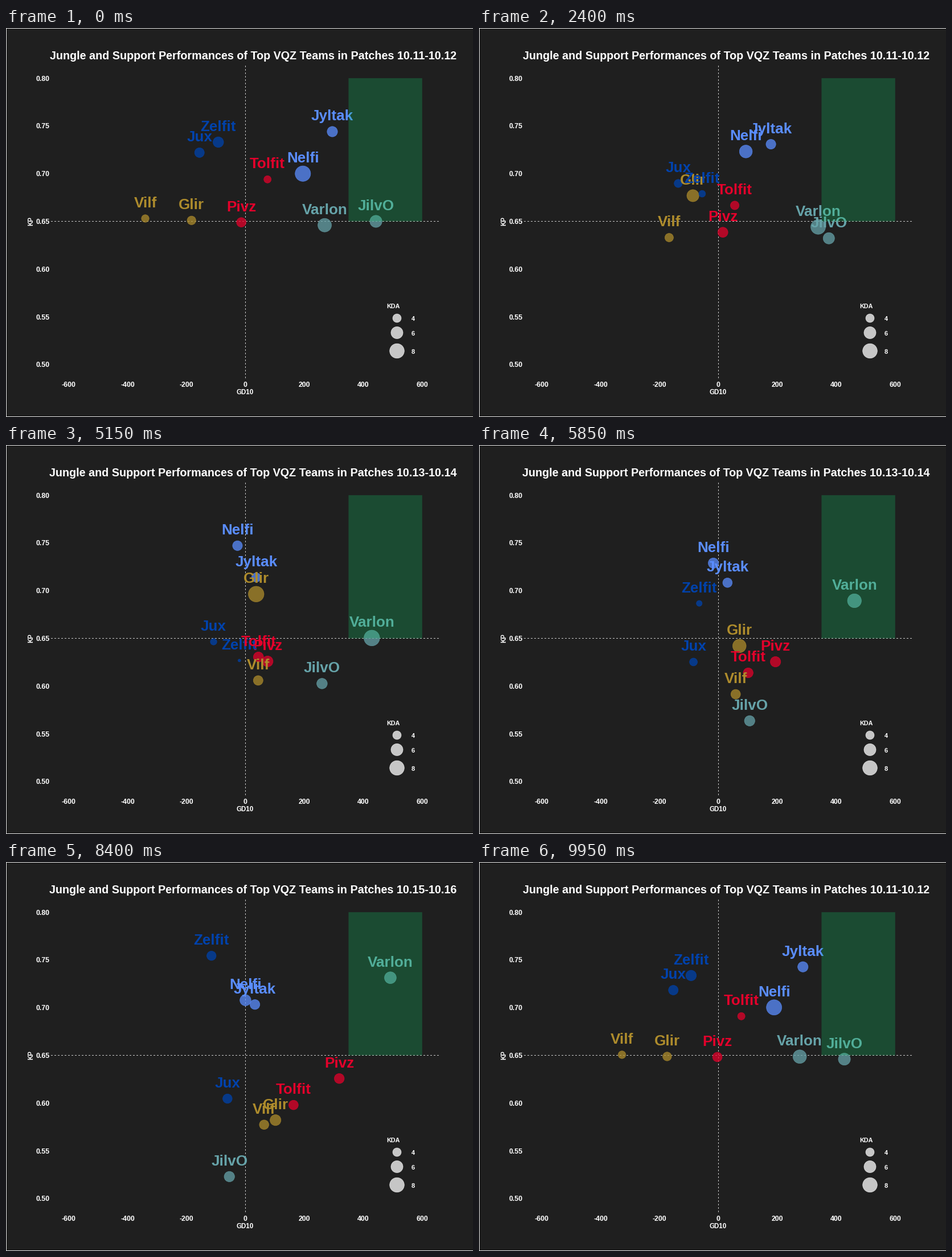
Write a matplotlib script that moves like this. It is 820 px wide and 683 px high and loops after 10000 ms.

```python
import math

import matplotlib.pyplot as plt
from matplotlib.animation import FuncAnimation
from matplotlib.patches import Circle, Rectangle

W, H, DPI = 820, 683, 64
FRAMES, INTERVAL = 200, 50
CYCLE = FRAMES / 3         # one hold plus one transition
MOVE = 33                  # frames per transition
TITLE_LAG = 18             # frames into a transition when the title switches

BACK = "#1f1f1f"
TEAL, GOLD, RED = "#66a3a9", "#ae8c2c", "#e4012b"
SKY, NAVY = "#5a8dff", "#0042ac"

# Name, colour, (GD10, KP) in each patch pair, KDA in the first two
PLAYERS = [
    ("Varlon", TEAL, (269, .646), (422, .642), (499, .734), (7.2, 9.4)),
    ("Glir", GOLD, (-183, .651), (29, .708), (111, .580), (4.1, 9.4)),
    ("Pivz", RED, (-14, .649), (50, .626), (329, .625), (4.5, 5.3)),
    ("Jyltak", SKY, (295, .744), (38, .715), (24, .702), (5.0, 4.3)),
    ("Zelfit", NAVY, (-92, .733), (-11, .614), (-116, .755), (5.1, 2.3)),
    ("JilvO", TEAL, (443, .650), (293, .611), (-70, .519), (6.1, 5.1)),
    ("Jux", NAVY, (-156, .722), (-113, .651), (-58, .601), (4.6, 3.1)),
    ("Tolfit", RED, (75, .694), (32, .634), (166, .595), (3.5, 4.9)),
    ("Nelfi", SKY, (195, .700), (-29, .751), (-6, .708), (8.8, 4.6)),
    ("Vilf", GOLD, (-340, .653), (40, .609), (76, .575), (3.6, 4.6)),
]

plt.rcParams["font.family"] = "Liberation Sans"
plt.rcParams["font.weight"] = "bold"


def px(n):
    """Pixels to points."""
    return n * 72 / DPI


def x_of(gd):
    return 420.4 + 0.5173 * gd


def y_of(kp):
    return 339.5 + 1676 * (0.65 - kp)


def radius(kda):
    return 1 + 4.93 * math.sqrt(kda - 2.27)


def states(points, kdas):
    """Pixel x, y and radius per patch pair; the last KDA settles to the middle."""
    last = 3.2 + 0.16 * sum(kdas)
    return [(x_of(gd), y_of(kp), radius(k))
            for (gd, kp), k in zip(points, (*kdas, last))]


fig = plt.figure(figsize=(W / DPI, H / DPI), dpi=DPI, facecolor=BACK)
ax = fig.add_axes([0, 0, 1, 1])
ax.set_xlim(0, W)
ax.set_ylim(H, 0)
ax.axis("off")


def write(x, y, s, size, color="white", ha="center", va="baseline", **kw):
    return ax.text(x, y, s, fontsize=px(size), color=color, ha=ha, va=va, **kw)


def dot(x, y, r, color):
    return ax.add_patch(Circle((x, y), r, facecolor=color, edgecolor=color,
                               alpha=0.75, linewidth=px(0.7), zorder=2))


def line(xs, ys, width, **kw):
    ax.plot(xs, ys, color="white", lw=px(width), snap=False, zorder=1, **kw)


# Axes, guides and target zone
for i in range(7):
    kp, gd = 0.8 - 0.05 * i, 200 * i - 600
    write(76.5, y_of(kp) + 4.5, f"{kp:.2f}", 12.3, ha="right")
    write(x_of(gd), 629.5, str(gd), 12.3)
write(420, 643, "GD10", 11.5)
write(44.5, 339.5, "KP", 11.5, va="center", rotation=90)

for xs, ys in (((79, 761), (339.5, 339.5)), ((420.5, 420.5), (615, 63))):
    line(xs, ys, 0.75, dashes=(4, 4), dash_capstyle="butt")
line((W, 0.5, 0.5, W), (0.5, 0.5, H - 0.5, H - 0.5), 0.9)

ax.add_patch(Rectangle((x_of(350), y_of(0.8)), x_of(600) - x_of(350),
                       y_of(0.65) - y_of(0.8), facecolor="#13cf6b",
                       alpha=0.25, linewidth=0, snap=False, zorder=4))

# Size legend
write(680, 491.5, "KDA", 10.8)
for kda, y in ((4, 509.5), (6, 535), (8, 567)):
    dot(686.5, y, radius(kda), "white")
    write(714.5, y + 5, str(kda), 11)

title = write(434, 54.8, "", 19.7)
tracks = [states(p[2:5], p[5]) for p in PLAYERS]
dots = [dot(0, 0, 1, p[1]) for p in PLAYERS]
names = [write(0, 0, p[0], 26, p[1], zorder=3) for p in PLAYERS]


def update(frame):
    leg = int(frame // CYCLE)
    step = frame - round(CYCLE * (leg + 0.5))
    # Each hold straddles a cycle boundary, so a move runs on into the next leg
    t = min(max(step / MOVE, 0), 1)
    nxt = (leg + 1) % 3
    shown = nxt if step >= TITLE_LAG else leg
    title.set_text("Jungle and Support Performances of Top VQZ Teams in Patches "
                   f"10.{11 + 2 * shown}-10.{12 + 2 * shown}")
    for track, circle, name in zip(tracks, dots, names):
        x, y, r = (a + (b - a) * t for a, b in zip(track[leg], track[nxt]))
        circle.center = x, y
        circle.radius = r
        name.set_position((x, y - 19.5))
    return [title, *dots, *names]


anim = FuncAnimation(fig, update, frames=FRAMES, interval=INTERVAL,
                     init_func=lambda: update(0), repeat=True, repeat_delay=0)
plt.show()
```
